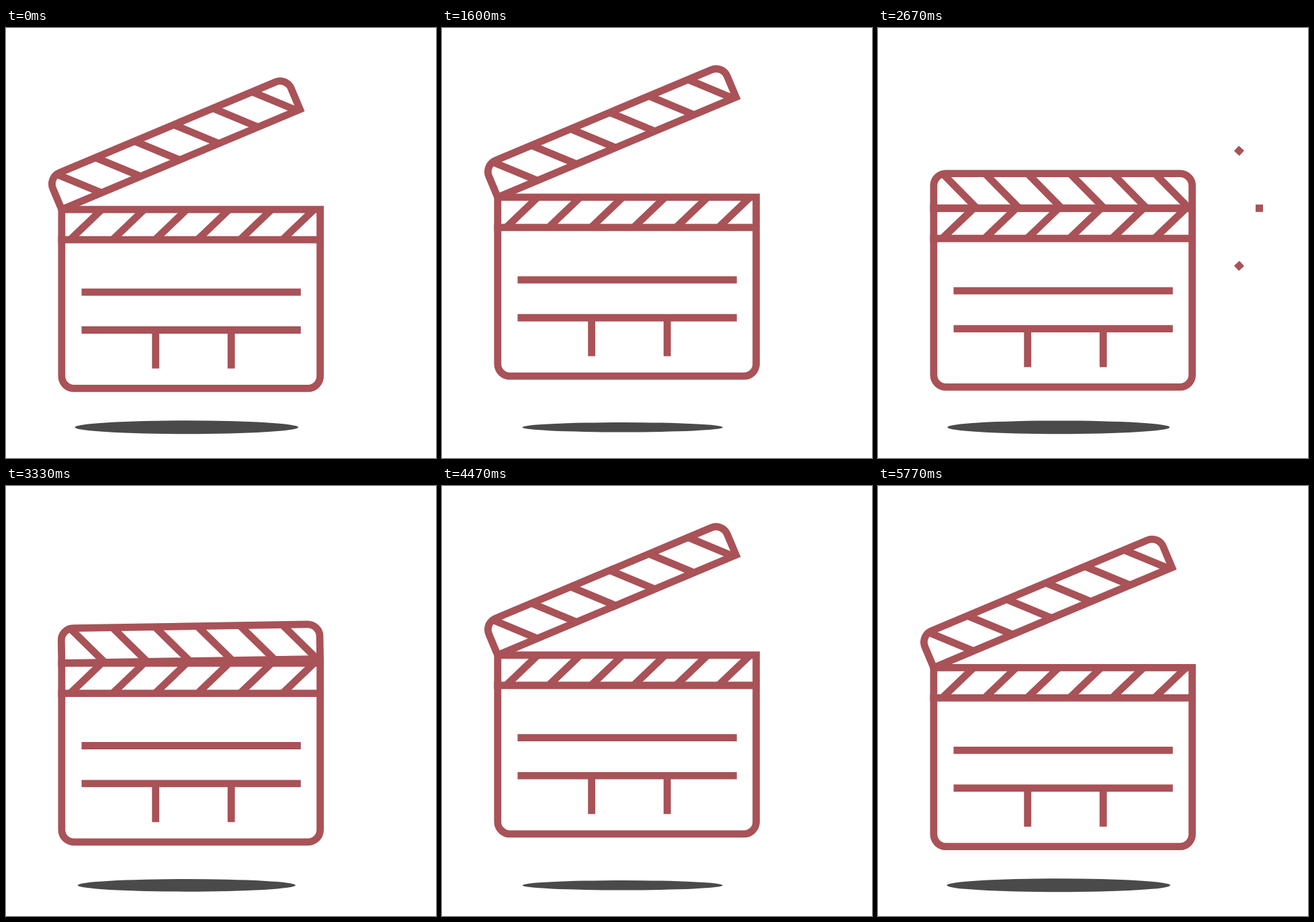
An HTML page for the animation above (5810 ms loop, 640 by 640 pixels).

```html
<!DOCTYPE html>
<html lang="en">
<head>
<meta charset="utf-8">
<title>Clapperboard</title>
<style>
  html, body { margin: 0; width: 100%; height: 100%; overflow: hidden; background: #fff; }
  svg { display: block; width: 100vw; height: 100vh; }
  #board { fill: none; stroke: #a95257; stroke-width: 10.8; }
</style>
</head>
<body>
<svg viewBox="0 0 640 640">
  <ellipse id="shadow" cx="268.8" cy="594.3" rx="166.3" ry="10" fill="#4a4a4a"/>
  <g id="board">
    <path d="M82.9 270.4H467.6V518.6a18 18 0 0 1-18 18H100.9a18 18 0 0 1-18-18Z"/>
    <path d="M77.5 315.4H473M112.5 393.3H438.8M112.5 449.7H438.8M222.7 450V507M335.2 450V507"/>
    <path id="lowerStripes"/>
    <g id="flap">
      <path d="M82.9 270.4V236.7a18 18 0 0 1 18-18H449.6a18 18 0 0 1 18 18V270.4Z"/>
      <path id="upperStripes"/>
    </g>
    <path id="burst" pathLength="1" d=""/>
  </g>
</svg>
<script>
  const LOOP = 5810, HALF = LOOP / 2;
  const PIVOT = '82.9 270.4';
  const OPEN = 22.8, OVERSHOOT = 24.7;
  const $ = id => document.getElementById(id);

  const stripes = (x1, y1, x2, y2) => Array.from({ length: 6 }, (_, i) => {
    const shift = i * 63.2;
    return `M${x1 + shift} ${y1}L${x2 + shift} ${y2}`;
  }).join('');
  $('lowerStripes').setAttribute('d', stripes(95.5, 315.4, 142.5, 270.4));
  $('upperStripes').setAttribute('d', stripes(96, 218.7, 147, 270.4));

  const progress = (t, from, to) => Math.min(1, Math.max(0, (t - from) / (to - from)));
  const smooth = p => (1 - Math.cos(Math.PI * p)) / 2;

  // The clap is symmetric in time around the middle of the loop.
  function flapAngle(t) {
    const d = Math.abs(t - HALF);
    return OVERSHOOT * smooth(progress(d, 340, 1030))
      - (OVERSHOOT - OPEN) * smooth(progress(d, 1030, 1290));
  }

  const rays = [[497, 229, 541, 181], [505, 270.4, 573, 270.4], [497, 312, 541, 360]];

  function burstPath(t) {
    const head = progress(t, 2340, 2400), tail = progress(t, 2520, 2700);
    if (head <= tail) return '';
    return rays.map(([x1, y1, x2, y2]) => {
      const at = p => `${x1 + (x2 - x1) * p} ${y1 + (y2 - y1) * p}`;
      return `M${at(tail)}L${at(head)}`;
    }).join('');
  }

  function draw(t) {
    const wave = Math.abs(Math.sin(Math.PI * (t + 38) / HALF));
    const lift = 19 * wave ** 1.4;
    const shrink = wave * wave;
    $('board').setAttribute('transform', `translate(0 ${-lift})`);
    $('flap').setAttribute('transform', `rotate(${-flapAngle(t)} ${PIVOT})`);
    $('burst').setAttribute('d', burstPath(t));
    $('shadow').setAttribute('rx', 166.3 - 17.7 * shrink);
    $('shadow').setAttribute('ry', 10 - 2.85 * shrink);
  }

  const start = performance.now();
  function tick() {
    draw((performance.now() - start) % LOOP);
    requestAnimationFrame(tick);
  }
  tick();
</script>
</body>
</html>
```
